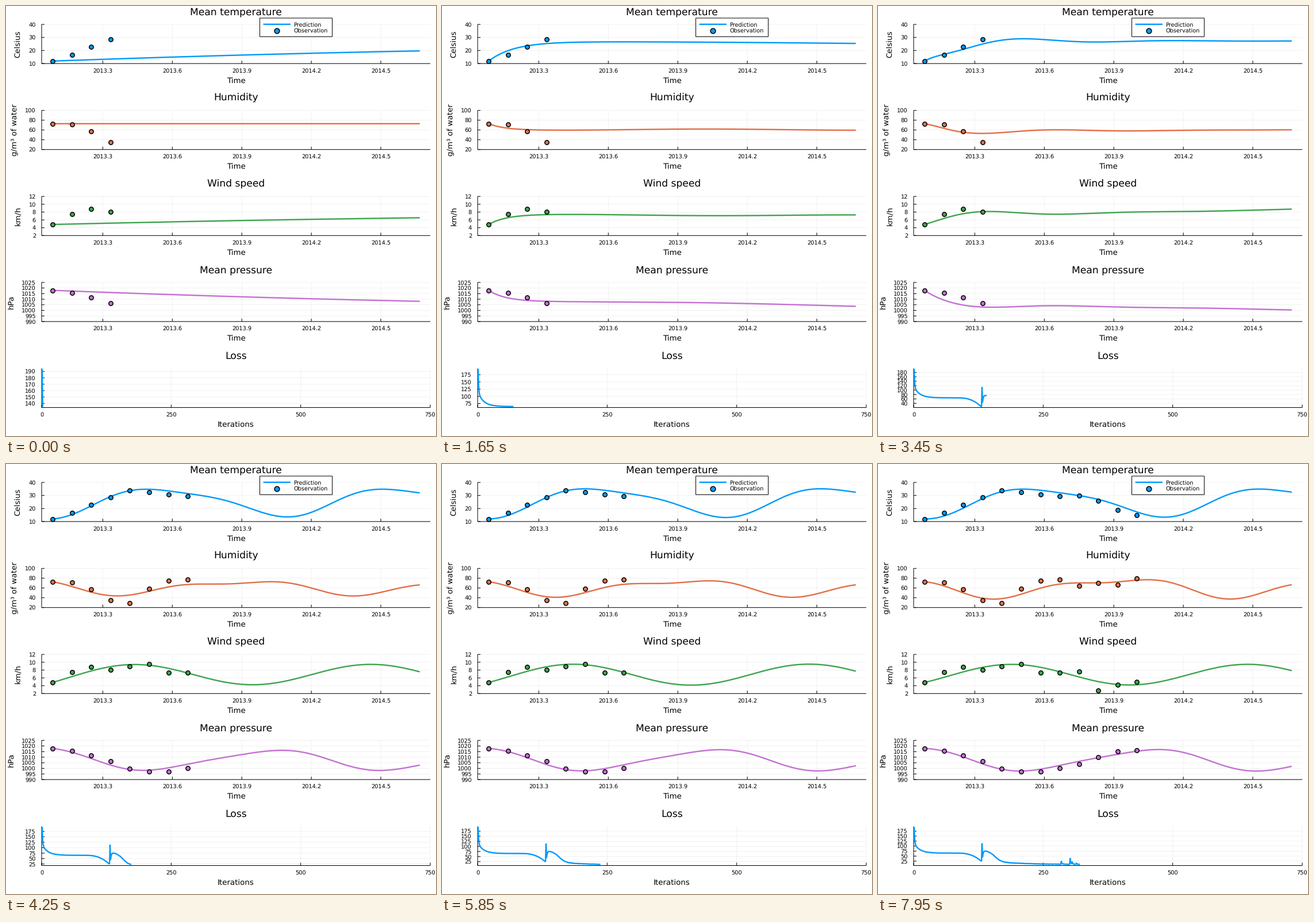
These frames come from a looping animation (748x748 px, 8000 ms). A matplotlib script:

```python
import numpy as np
import matplotlib.pyplot as plt
from matplotlib.animation import FuncAnimation
from matplotlib.patches import Rectangle

SIZE, FRAMES, INTERVAL = 748, 160, 50
PT = 0.72  # points per pixel at 100 dpi
LEFT, RIGHT, TOP, HEIGHT, PITCH = 62, 738, 32, 68.1, 149.6
T_LEFT, T_STEP = 81.1, 33.57
BLUE, ORANGE, GREEN, PURPLE = "#009afa", "#e36f47", "#3ea44e", "#c371d2"

plt.rcParams.update({"font.family": "DejaVu Sans", "path.snap": False,
                     "text.hinting": "no_hinting"})
fig = plt.figure(figsize=(SIZE / 100, SIZE / 100), dpi=100, facecolor="white")
ax = fig.add_axes([0, 0, 1, 1])
ax.set_xlim(0, SIZE)
ax.set_ylim(SIZE, 0)
ax.axis("off")


def text(x, y, s, px, ha="center", rotation=0):
    return ax.text(x, y, s, fontsize=px * PT, ha=ha, va="baseline",
                   rotation=rotation, rotation_mode="anchor", color="black")


def line(xs, ys, color="black", width=1.0, z=2, cap="butt"):
    return ax.plot(xs, ys, color=color, lw=width * PT, zorder=z,
                   solid_capstyle=cap, solid_joinstyle="round")[0]


def dots(xs, ys, color, size):
    return ax.plot(xs, ys, "o", ms=size * PT, mfc=color, mec="black",
                   mew=1.5 * PT, zorder=5)[0]


def y_tick(y, label):
    return (line([LEFT, RIGHT], [y, y], "#eeeeee", 0.8, 1),
            line([LEFT, LEFT + 5], [y, y]),
            text(52, y + 3.6, label, 9.77, "right"))


def draw_axes(i, title, xlabel, x_ticks):
    top = TOP + PITCH * i
    base = top + HEIGHT
    text(400, top - 16.8, title, 17.1)
    text(400, base + 34.3, xlabel, 13.43)
    line([LEFT, RIGHT], [base, base])
    line([LEFT, LEFT], [top, base])
    for x, label in x_ticks:
        line([x, x], [top, base], "#eeeeee", 0.8, 1)
        line([x, x], [base, base - 5])
        text(x, base + 15.4, label, 9.77)


def to_y(i, v, lo, hi):
    return TOP + PITCH * i + HEIGHT * (hi - np.asarray(v)) / (hi - lo)


# title, unit, colour, limits, tick step, label baseline, monthly observations
PANELS = [
    ("Mean temperature", "Celsius", BLUE, 10, 40, 10, 25.4,
     [11.9, 16.7, 22.8, 28.7, 33.8, 32.4, 30.6, 29.5, 29.8, 26.1, 18.8, 15.1]),
    ("Humidity", "g/m³ of water", ORANGE, 20, 100, 20, 19.3,
     [72.8, 71.8, 57.4, 34.6, 28.8, 58.7, 74.8, 76.7, 64.6, 70.1, 66.1, 79.2]),
    ("Wind speed", "km/h", GREEN, 2, 12, 2, 25.4,
     [4.83, 7.47, 8.77, 8.03, 8.93, 9.58, 7.32, 7.37, 7.58, 2.81, 4.24, 4.98]),
    ("Mean pressure", "hPa", PURPLE, 990, 1025, 5, 13.1,
     [1017.9, 1015.9, 1011.7, 1006.2, 999.8, 997.3, 997.4, 1000.4, 1003.9,
      1009.9, 1015.3, 1016.2]),
]


def column(values):
    return np.array(values, float)[:, None]


t = np.linspace(0, 19, 240)
u19 = t / 19
start = column([p[-1][0] for p in PANELS])
turn = column([5.3, 3.2, 3.5, 3.5])  # month of each first bend


def drift(change):
    """Almost straight first guess."""
    return start + column(change) * u19 * (1.3 - 0.3 * u19)


def settle(rise, swing, tail, period=16, fade=1e6):
    """Quick approach to a level, with a swing around it and a slow tail."""
    wave = np.cos(2 * np.pi * (t - turn) / period) * np.exp(-t / fade)
    level = column(rise) + column(swing) * wave
    return start + (1 - np.exp(-4 * t / turn)) * level + column(tail) * u19 ** 2


def season(gain, lead=0):
    """Yearly cycle of two harmonics, pinned to the first observation."""
    mean, a1, b1, a2, b2 = (column(c) for c in zip(
        (25.4, -10.2, 0.96, -1.8, -1.25),
        (61.4, 7, -15.8, 6.6, 2.45),
        (6.83, -1.76, 1.96, 0, 0),
        (1007.5, 8.6, -3.3, 0.7, 1.3)))
    a = 2 * np.pi * (t + lead) / 12.25
    wave = a1 * np.cos(a) + b1 * np.sin(a) + a2 * np.cos(2 * a) + b2 * np.sin(2 * a)
    v = mean + column(gain) * wave
    return v + (start - v[:, :1]) * np.exp(-t / 1.5)


def linear(u):
    return u


def smooth(u):
    return u * u * (3 - 2 * u)


# iteration, easing on the way there, fitted curves
FITS = [
    (2, None, drift([7.8, 0, 1.71, -9.8])),
    (68, lambda u: (1 - np.exp(-8 * u)) / (1 - np.exp(-8)),
     settle([15, -12.1, 2.45, -9.8], [0, -1.2, .15, -.2], [-1.5, 0, -.15, -4.3])),
    (110, lambda u: u * u,
     settle([15.9, -11.8, 2.5, -7.5], [0, -8, .75, -2.5], [-2.9, 0, -.1, -9])),
    (130, linear,
     settle([16, -14, 2.6, -11], [3.8, -12, 1.3, -5], [-2, 2, 0, -2], 14)),
    (140, smooth,
     settle([15.4, -14.8, 2.7, -13.8], [7.5, -12, 1.5, -3.5],
            [0, 2.5, 1.2, -3.7], 8, 4)),
    (202, lambda u: smooth(min(1, 1.8 * u)), season([1, .75, 1, .95], 0.25)),
    (272, linear, season([1.05, .97, 1.04, 1.03])),
    (320, linear, season([1, 1, 1, 1])),
]
times = [fit[0] for fit in FITS]

# loss: fast decay, dip, one big spike, a second descent, then small spikes
its = np.arange(1, 2 * FRAMES + 1)
first = (65 + 80 * np.exp(-(its - 1) / 0.9) + 48 * np.exp(-(its - 1) / 11)
         - 39 * np.clip((its - 85) / 45, 0, 1) ** 2.5)
late = np.maximum(its - 133, 0)
second = (7 + 16 * np.exp(-(its - 150) / 60) + 52 / (1 + np.exp((its - 157) / 6))
          - 34 * np.exp(-late / 1.5))
loss = np.where(its < 132, first, second)
loss[its == 132] = 112
for at, height in ((285, 15), (302, 29), (306, 11), (314, 7)):
    loss += (its >= at) * height * np.exp(-np.maximum(its - at, 0) / 1.3)
loss += (its > 150) * np.random.default_rng(4).uniform(0, 1.2, len(its))


def nice_ticks(lo, hi):
    """Tick values balancing count, coverage and roundness."""
    best, found = -1, []
    for step, nice in ((10, 1), (50, .9), (5, .9), (25, .5), (20, .7), (30, .2)):
        ticks = np.arange(np.ceil(lo / step), np.floor(hi / step) + 1) * step
        n = len(ticks)
        if not 4 <= n <= 8:
            continue
        score = (.25 * (1 - abs(n - 5) / 5) + .25 * nice
                 + .5 * (hi - lo) / (step * (n - 1)))
        if score > best + 1e-9:
            best, found = score, ticks
    return found


years = [(168.4 + 120.9 * k, f"{2013.3 + 0.3 * k:.1f}") for k in range(5)]
fit_lines, obs_dots = [], []
for i, (title, unit, color, lo, hi, step, base_x, obs) in enumerate(PANELS):
    draw_axes(i, title, "Time", years)
    for v in range(lo, hi + 1, step):
        y_tick(to_y(i, v, lo, hi), str(v))
    text(base_x, TOP + PITCH * i + HEIGHT / 2, unit, 13.43, rotation=90)
    fit_lines.append(line(T_LEFT + T_STEP * t, 0 * t, color, 2.4, 4, "round"))
    obs_dots.append(dots([], [], color, 7.4))

draw_axes(4, "Loss", "Iterations",
          [(LEFT + (RIGHT - LEFT) * v / 750, str(v)) for v in (0, 250, 500, 750)])
loss_line = line([], [], BLUE, 2.4, 4, "round")
loss_ticks = [y_tick(0, "") for _ in range(8)]

ax.add_patch(Rectangle((441.5, 21), 126, 32.3, fc="white", ec="black",
                       lw=PT, zorder=6))
line([447.5, 495], [31.8, 31.8], BLUE, 2.4, 7)
dots([471.3], [42.7], BLUE, 8.8).set_zorder(7)
for y, label in ((35.5, "Prediction"), (46.3, "Observation")):
    text(500.5, y, label, 9.77, "left").set_zorder(7)


def fitted(it):
    j = int(np.clip(np.searchsorted(times, it), 1, len(times) - 1))
    (t0, _, before), (t1, ease, after) = FITS[j - 1], FITS[j]
    w = ease((it - t0) / (t1 - t0))
    return (1 - w) * before + w * after


def update(k):
    it = 2 * k + 2
    count = 4 * (1 + k // 75)  # four more months per training stage
    for i, values in enumerate(fitted(it)):
        lo, hi, obs = PANELS[i][3], PANELS[i][4], PANELS[i][7]
        fit_lines[i].set_ydata(to_y(i, values, lo, hi))
        obs_dots[i].set_data(T_LEFT + T_STEP * np.arange(count),
                             to_y(i, obs[:count], lo, hi))

    seen = loss[:it]
    pad = 0.03 * (seen.max() - seen.min())
    lo, hi = seen.min() - pad, seen.max() + pad
    loss_line.set_data(LEFT + (RIGHT - LEFT) * its[:it] / 750,
                       to_y(4, seen, lo, hi))
    ticks = nice_ticks(lo, hi)
    for n, (grid, mark, label) in enumerate(loss_ticks):
        shown = n < len(ticks)
        for part in (grid, mark, label):
            part.set_visible(shown)
        if shown:
            y = float(to_y(4, ticks[n], lo, hi))
            grid.set_ydata([y, y])
            mark.set_ydata([y, y])
            label.set_y(y + 3.6)
            label.set_text(f"{ticks[n]:.0f}")
    return []


anim = FuncAnimation(fig, update, frames=FRAMES, interval=INTERVAL,
                     repeat=True, repeat_delay=0, blit=False)
plt.show()
```
